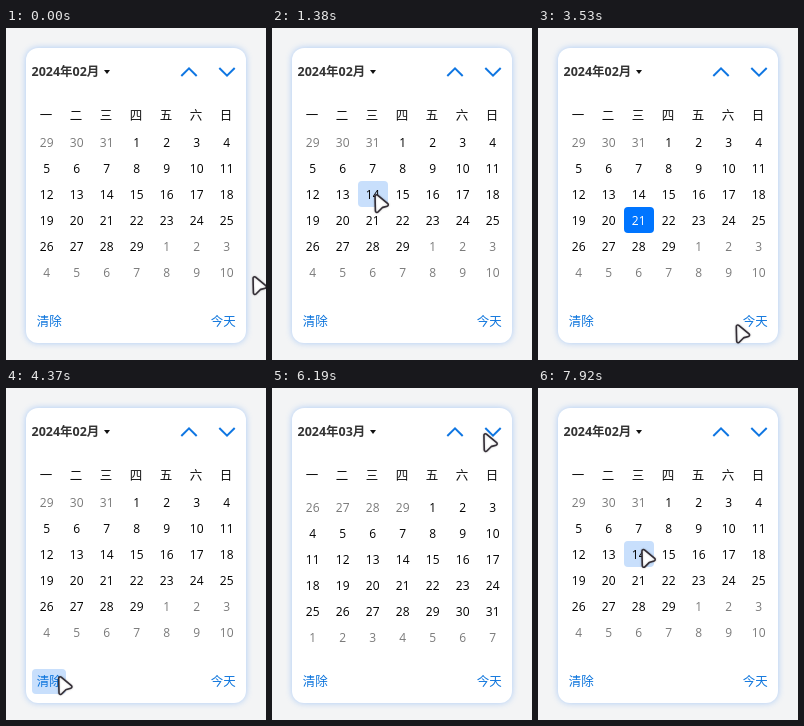
An HTML page with a canvas that plays this animation: 260 px wide and 332 px high, repeating every 8 s.

```html
<!DOCTYPE html>
<html lang="zh-CN">
<head>
<meta charset="utf-8">
<title>日期选择</title>
<style>
  html, body { margin: 0; width: 100%; height: 100%; overflow: hidden; background: #f3f4f5; }
  canvas { display: block; width: 260px; height: 332px; }
</style>
</head>
<body>
<canvas id="stage"></canvas>
<script>
const LOOP = 8000;
const FAMILY = '"Open Sans", "Noto Sans CJK SC", "Noto Sans CJK", sans-serif';
const BLUE = '#0075ff', LINK = '#0a73dc', HOVER = '#c8dffc';
const ROW = 26, COL = 30, LEFT = 26, TOP = 101, NAV_Y = 44;
const UP = 183, DOWN = 221, CLEAR = 43, TODAY = 217;

// Moments of the clicks
const PICK = 1790, PICK_TODAY = 2810, WIPE = 4020, NEXT = 5805, BACK = 6890;

// Pointer position over a day, by column and row
const cell = (c, r) => [LEFT + COL * c + 16, TOP + ROW * r + 12];

// Pointer moves: start, end, destination
const moves = [
  [30, 240, cell(4, 2)],
  [560, 1000, cell(1.2, 2.73)],
  [1100, 1380, cell(2, 2)],
  [2070, 2500, [TODAY - 4, 296]],
  [3450, 3870, [CLEAR + 8, 288]],
  [4340, 5150, [197, 55]],
  [5150, 5390, [DOWN - 6, NAV_Y]],
  [6085, 6580, [UP - 3, NAV_Y]],
  [7650, 7920, cell(2.03, 1.8)]
];

const canvas = document.getElementById('stage');
const ctx = canvas.getContext('2d');
const dpr = window.devicePixelRatio || 1;
canvas.width = 260 * dpr;
canvas.height = 332 * dpr;

const clamp = v => Math.max(0, Math.min(1, v));
const smooth = p => p * p * (3 - 2 * p);
const cubic = p => p < .5 ? 4 * p ** 3 : 1 - (2 - 2 * p) ** 3 / 2;
const glide = start => cubic(clamp((start) / 500));

function pointer(t) {
  let x = 246, y = 247;
  for (const [start, end, [toX, toY]] of moves) {
    const k = smooth(clamp((t - start) / (end - start)));
    x += (toX - x) * k;
    y += (toY - y) * k;
  }
  return [x, y];
}

function box(x, y, w, h, r, color) {
  ctx.fillStyle = color;
  ctx.beginPath();
  ctx.roundRect(x, y, w, h, r);
  ctx.fill();
}

function text(str, x, y, color, size = 12.5, align = 'center', weight = '') {
  ctx.font = `${weight} ${size}px ${FAMILY}`;
  ctx.textAlign = align;
  ctx.fillStyle = color;
  ctx.fillText(str, x, y);
}

function chevron(x, dir) {
  ctx.beginPath();
  ctx.moveTo(x - 7.7, NAV_Y + 4 * dir);
  ctx.lineTo(x, NAV_Y - 3.6 * dir);
  ctx.lineTo(x + 7.7, NAV_Y + 4 * dir);
  ctx.strokeStyle = '#0f76e2';
  ctx.lineWidth = 2;
  ctx.stroke();
}

function button(x, y, w, h, [px, py]) {
  if (Math.abs(px - x) < w / 2 && Math.abs(py - y) < h / 2) {
    box(x - w / 2, y - h / 2, w, h, 4, HOVER);
  }
}

function drawPanel() {
  ctx.fillStyle = '#f3f4f5';
  ctx.fillRect(0, 0, 260, 332);
  ctx.save();
  ctx.shadowColor = 'rgba(60, 140, 250, .4)';
  ctx.shadowBlur = 6 * dpr;
  box(20, 20, 220, 295, 12, '#fff');
  ctx.restore();
}

function drawHeader(month, hover) {
  for (const x of [UP, DOWN]) button(x, NAV_Y, 26, 26, hover);
  text(`2024年0${month + 1}月`, 25.5, 48, '#333', 12.5, 'left', 'bold');
  ctx.fillStyle = '#111';
  ctx.beginPath();
  ctx.moveTo(98, 42);
  ctx.lineTo(104, 42);
  ctx.lineTo(101, 46);
  ctx.fill();
  chevron(UP, 1);
  chevron(DOWN, -1);
  [...'一二三四五六日'].forEach((d, i) => text(d, 40 + COL * i, 92.3, '#111'));
}

function drawDays(t, month, [hx, hy]) {
  const scroll = 4 * ROW * (glide(t - NEXT) - glide(t - BACK));
  const picked = t < PICK || t >= WIPE ? 0 : t < PICK_TODAY ? 14 : 21;
  ctx.save();
  ctx.beginPath();
  ctx.rect(20, TOP, 220, 161);
  ctx.clip();
  for (let i = 0; i < 77; i++) {
    const date = new Date(2024, 0, 29 + i);
    const x = LEFT + COL * (i % 7);
    const y = TOP + ROW * Math.floor(i / 7) - scroll;
    const current = date.getMonth() === month;
    const selected = current && date.getDate() === picked;
    const over = hx >= x && hx < x + COL && hy >= y && hy < y + ROW && hy < TOP + 6 * ROW;
    if (selected || over) box(x, y, COL, ROW, 4, selected ? BLUE : HOVER);
    const color = selected ? '#fff' : current ? '#000' : '#7a7a7a';
    text(date.getDate(), x + 14.7, y + 18.3, color, 12);
  }
  ctx.restore();
}

function drawFooter(hover) {
  for (const [label, x] of [['清除', CLEAR], ['今天', TODAY]]) {
    button(x, 293.5, 34, 25, hover);
    text(label, x + .2, 298.4, LINK);
  }
}

function drawPointer([x, y]) {
  const corners = [[1, 0], [16, 12.5], [8.5, 14.5], [1.5, 21.5]];
  ctx.save();
  ctx.translate(x, y);
  ctx.beginPath();
  ctx.moveTo(1.2, 10);
  corners.forEach(([cx, cy], i) => ctx.arcTo(cx, cy, ...(corners[i + 1] || [1.2, 10]), 1.5));
  ctx.closePath();
  ctx.shadowColor = 'rgba(0, 0, 0, .25)';
  ctx.shadowBlur = 2 * dpr;
  ctx.fillStyle = '#fff';
  ctx.fill();
  ctx.strokeStyle = '#332d35';
  ctx.lineWidth = 1.6;
  ctx.stroke();
  ctx.restore();
}

function draw(t) {
  ctx.setTransform(dpr, 0, 0, dpr, 0, 0);
  const month = t >= NEXT && t < BACK ? 2 : 1;
  // Highlights run slightly ahead of the drawn pointer
  const hover = pointer(t + 40);
  drawPanel();
  drawHeader(month, hover);
  drawDays(t, month, hover);
  drawFooter(hover);
  drawPointer(pointer(t));
}

function tick() {
  draw(performance.now() % LOOP);
  requestAnimationFrame(tick);
}
tick();
</script>
</body>
</html>
```
